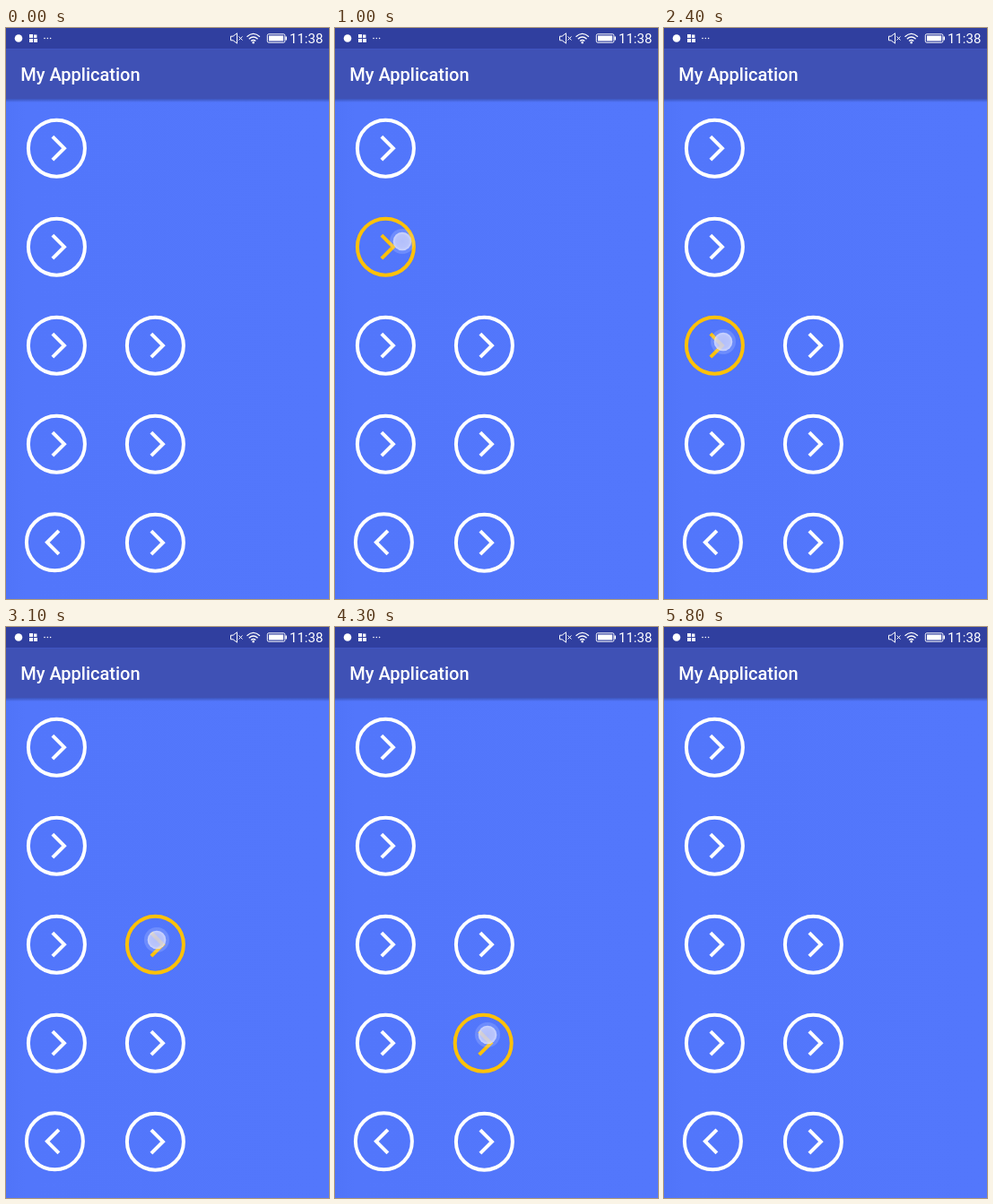
These frames come from a looping animation (360x637 px, 6500 ms). An HTML page:

```html
<!DOCTYPE html>
<html lang="en">
<head>
<meta charset="utf-8">
<title>Button states</title>
<style>
  html, body { margin: 0; width: 100%; height: 100%; overflow: hidden; background: #5276fb; }
  svg { display: block; width: 360px; height: 637px; }
  text { font-family: Roboto, "Noto Sans", sans-serif; fill: #fff; }
  .line { fill: none; stroke-width: 4; }
</style>
</head>
<body>
<svg id="stage" viewBox="0 0 360 637" xmlns="http://www.w3.org/2000/svg">
  <defs>
    <linearGradient id="page">
      <stop offset="0" stop-color="#5074f8"/>
      <stop offset=".06" stop-color="#5276fb"/>
      <stop offset="1" stop-color="#5377fc"/>
    </linearGradient>
    <linearGradient id="shade" x2="0" y2="1">
      <stop offset="0" stop-color="#26357f" stop-opacity=".5"/>
      <stop offset="1" stop-color="#26357f" stop-opacity="0"/>
    </linearGradient>
    <radialGradient id="spot">
      <stop offset="0" stop-color="#c3cbfa"/>
      <stop offset=".7" stop-color="#cbd2fb"/>
      <stop offset="1" stop-color="#e2e6ff"/>
    </radialGradient>
  </defs>

  <rect width="360" height="637" fill="url(#page)"/>
  <rect width="360" height="23.5" fill="#303f9f"/>
  <rect y="23.5" width="360" height="55.5" fill="#3f51b5"/>
  <rect y="79" width="360" height="4" fill="url(#shade)"/>
  <text x="16.2" y="59" font-size="20" font-weight="500">My Application</text>

  <g fill="#fff">
    <circle cx="14" cy="11.5" r="4.3"/>
    <path d="M26 7h4v4h-4zM26 12h4v4h-4zM31 12h4v4h-4zM31 7.5h3.4v3.4h-3.4z"/>
    <circle cx="43" cy="11.5" r=".8"/>
    <circle cx="46.3" cy="11.5" r=".8"/>
    <circle cx="49.6" cy="11.5" r=".8"/>
  </g>
  <g fill="none" stroke="#fff" stroke-width="1">
    <path d="M250.5 9.2h2.6l4.4-3.4v11.4l-4.4-3.4h-2.6zM259.5 9.5l4 4m0-4l-4 4"/>
    <path stroke-width="1.3" d="M268.5 9.7q7.2-6.6 14.4 0M270.8 12.2q4.9-4.3 9.8 0M273.1 14.6q2.6-2.3 5.2 0"/>
    <rect x="291.3" y="6.8" width="19.6" height="9.4" rx="1.5"/>
  </g>
  <g fill="#fff">
    <circle cx="275.7" cy="16.2" r="1.2"/>
    <rect x="293" y="8.5" width="16.2" height="6"/>
    <rect x="311.4" y="9.5" width="1.6" height="4"/>
  </g>
  <text x="316" y="17" font-size="15">11:38</text>

  <g id="buttons"></g>
  <g id="touch">
    <circle r="14" fill="#dce2ff" opacity=".22"/>
    <circle r="10.3" fill="url(#spot)" opacity=".9"/>
  </g>
</svg>
<script>
const LOOP = 6500;
const WHITE = "#fff", AMBER = "#ffc107";
const COL = 110, ROW = 110;
const $ = id => document.getElementById(id);

// start: finger down, hold: time pressed, fade: time the spot lingers; x, y: touch point
const taps = [
  { row: 0, col: 0, start: 100, hold: 300, x: 64, y: 137 },
  { row: 1, col: 0, start: 1000, x: 75, y: 238 },
  { row: 1, col: 1, start: 1700, x: 157, y: 245, hidden: true },
  { row: 2, col: 0, start: 2400, x: 66, y: 350 },
  { row: 2, col: 1, start: 3100, x: 168, y: 349 },
  { row: 3, col: 0, start: 3700, x: 66, y: 456, shift: -1.2 },
  { row: 3, col: 1, start: 4300, x: 170, y: 455, shift: -1.2 },
  { row: 4, col: 0, start: 5000, x: 63, y: 565, left: true },
  { row: 4, col: 1, start: 5600, hold: 100, x: 170, y: 566 }
].map(tap => ({ hold: 200, fade: 100, shift: 0, ...tap }));

function add(parent, tag, attrs) {
  const el = document.createElementNS("http://www.w3.org/2000/svg", tag);
  for (const key in attrs) el.setAttribute(key, attrs[key]);
  return parent.appendChild(el);
}

for (const tap of taps) {
  tap.el = add($("buttons"), "g", { class: "line" });
  add(tap.el, "circle", { r: 31.5 });
  add(tap.el, "path", { d: "M-4.5-13L8.5 0L-4.5 13" });
}

function place(tap, pressed) {
  const x = (tap.left ? 54.4 : 56.4) + tap.col * COL + (pressed ? tap.shift : 0);
  const y = (tap.left ? 573.8 : 134.2 + tap.row * ROW);
  tap.el.setAttribute("transform", `translate(${x} ${y}) scale(${tap.left ? -1 : 1} 1)`);
  tap.el.setAttribute("stroke", pressed ? AMBER : WHITE);
  tap.el.setAttribute("visibility", tap.hidden && !pressed ? "hidden" : "visible");
}

function draw(time) {
  // the screen refreshes ten times a second
  const now = Math.floor((time % LOOP) / 100) * 100;
  let opacity = 0;
  for (const tap of taps) {
    const age = now - tap.start;
    const pressed = age >= 0 && age < tap.hold;
    place(tap, pressed);
    if (age >= 0 && age < tap.hold + tap.fade) {
      opacity = pressed ? (age ? 1 : 0.92) : 0.35;
      $("touch").setAttribute("transform", `translate(${tap.x} ${tap.y})`);
    }
  }
  $("touch").setAttribute("opacity", opacity);
}

const begin = performance.now();
function tick() {
  draw(performance.now() - begin);
  requestAnimationFrame(tick);
}
tick();
</script>
</body>
</html>
```
